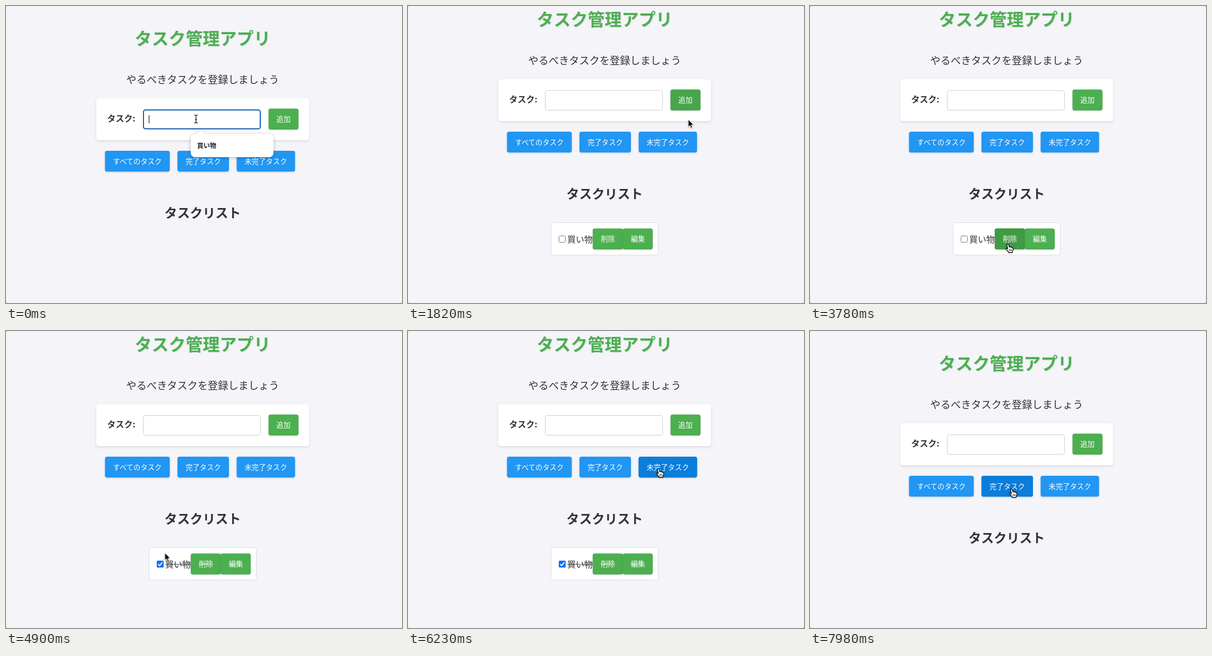
Animation of 746x560 px, one loop 8 s. Source, as an HTML page:

```html
<!DOCTYPE html>
<html lang="ja">
<head>
<meta charset="utf-8">
<title>タスク管理アプリ</title>
<style>
html, body { margin: 0; width: 100%; height: 100%; overflow: hidden; background: #a9a9ad; }
svg { display: block; width: 746px; height: 560px; font: 13.33px "Noto Sans CJK JP", "Noto Sans CJK", sans-serif; fill: #333; }
.mid { text-anchor: middle; }
.bold { font-weight: 700; }
.card { fill: #fff; filter: drop-shadow(0 2px 2.5px #0000001a); }
.title { font-size: 32px; fill: #4caf50; text-shadow: 1px 1px 2px #0000001a; }
.btn { filter: drop-shadow(0 1px 1.5px #0000002a); }
.btn text { fill: #fff; text-anchor: middle; }
.green rect { fill: #4caf50; }
.green .dark { fill: #419a45; }
.blue rect { fill: #2196f3; }
.blue .dark { fill: #0b7dda; }
.field { fill: #fff; stroke: #ccc; }

/* Every animation shares one 8 s clock; 1% is 80 ms. */
.step, .fade, .pointer { animation: 8s infinite; }
.step { animation-timing-function: step-end; }
.fade { animation-timing-function: ease; }

.page { animation-name: scroll; }
.list { animation-name: list; }
.check { animation-name: check; }
.focus { animation-name: focus; }
.caret { animation-name: caret; }
.filled { animation-name: filled; }
.popup { animation-name: popup; }
.row { animation-name: row; }
.add { animation-name: add; }
.del { animation-name: del; }
.done { animation-name: done; }
.todo { animation-name: todo; }
.pointer { animation-name: move; }
.beam { animation-name: beam; }
.arrow { animation-name: arrow; }
.hand { animation-name: hand; }
.press { animation-name: press; }

@keyframes scroll { 0%, 85.75%, 100% { transform: none } 21.875% { transform: translateY(-36px) } }
@keyframes list { 0%, 85.75%, 100% { opacity: 0 } 21.875% { opacity: 1 } }
@keyframes check { 0% { opacity: 0 } 56.875%, 100% { opacity: 1 } }
@keyframes focus { 0% { opacity: 1 } 20.125%, 100% { opacity: 0 } }
@keyframes caret { 0% { opacity: 1 } 3.5%, 100% { opacity: 0 } }
@keyframes filled { 0%, 21.875%, 100% { opacity: 0 } 3.5% { opacity: 1 } }
@keyframes popup { 0% { opacity: 1 } 8.75%, 100% { opacity: 0 } }
@keyframes row { 0% { opacity: 0 } 3.5%, 100% { opacity: 1 } }

@keyframes add { 0%, 12%, 24.5%, 100% { opacity: 0 } 14%, 21.875% { opacity: 1 } }
@keyframes del { 0%, 36.75%, 50.75%, 100% { opacity: 0 } 39.375%, 48.125% { opacity: 1 } }
@keyframes done { 0%, 64%, 77.875%, 96.5% { opacity: 0 } 66.5%, 75.25%, 99.5%, 100% { opacity: 1 } }
@keyframes todo { 0%, 75.8%, 97.2%, 100% { opacity: 0 } 77.875%, 94.5% { opacity: 1 } }

@keyframes move {
  0%, .8% { transform: translate(358px, 213px) }
  5.25%, 8.75% { transform: translate(378px, 268px); animation-timing-function: ease-in-out }
  13.1% { transform: translate(512px, 218px); animation-timing-function: linear }
  14% { transform: translate(516px, 216px) }
  15.75%, 29.75% { transform: translate(528px, 214px); animation-timing-function: ease-in-out }
  39.375%, 46.375% { transform: translate(375px, 450px); animation-timing-function: linear }
  47.25% { transform: translate(373px, 449px); animation-timing-function: ease-in-out }
  51.625%, 60.375% { transform: translate(290px, 440px); animation-timing-function: linear }
  61.25% { transform: translate(299px, 419px); animation-timing-function: ease-out }
  66.5%, 74.375% { transform: translate(373px, 259px); animation-timing-function: ease-in-out }
  77.875%, 92.75% { transform: translate(472px, 260px); animation-timing-function: ease-in-out }
  99.75%, 100% { transform: translate(380px, 298px) }
}
@keyframes beam { 0% { opacity: 1 } 2.625%, 100% { opacity: 0 } }
@keyframes arrow {
  0%, 12.25%, 36.75%, 64.2%, 100% { opacity: 0 }
  2.625%, 21.875%, 48.125% { opacity: 1 }
}
@keyframes hand {
  0%, 21.875%, 48.125% { opacity: 0 }
  12.25%, 36.75%, 64.2%, 100% { opacity: 1 }
}
@keyframes press {
  0%, 8.75%, 21.875%, 56.875%, 70.875%, 85.75%, 100% { opacity: 0 }
  7%, 20.125%, 55.125%, 69.125%, 84% { opacity: 1 }
}
</style>
</head>
<body>
<svg viewBox="0 0 746 560">
  <rect width="746" height="560" rx="3" fill="#f4f4f9"/>

  <g class="page step">
    <text class="title bold mid" x="370.5" y="73">タスク管理アプリ</text>
    <text class="mid" x="370.5" y="145.6" font-size="19.2">やるべきタスクを登録しましょう</text>

    <rect class="card" x="170" y="174" width="401" height="79" rx="5"/>
    <text class="bold" x="190.5" y="218" font-size="16">タスク:</text>
    <rect class="field" x="258.5" y="195.5" width="221" height="37" rx="4"/>
    <g class="filled step">
      <rect x="259" y="196" width="220" height="36" rx="4" fill="#e8f0fe"/>
      <text x="268.7" y="218" fill="#000">買い物</text>
    </g>
    <rect class="focus step" x="259" y="196" width="220" height="35.5" rx="4" fill="none" stroke="#1060b4" stroke-width="2"/>
    <path class="caret step" d="M269.5 206V221" stroke="#000"/>
    <g class="btn green">
      <rect x="494.5" y="193.5" width="56.5" height="39.5" rx="4"/>
      <rect class="dark add fade" x="494.5" y="193.5" width="56.5" height="39.5" rx="4"/>
      <text x="522.7" y="218">追加</text>
    </g>

    <g class="btn blue">
      <rect x="186.5" y="273" width="122" height="39.3" rx="4"/>
      <text x="247.5" y="297.5">すべてのタスク</text>
    </g>
    <g class="btn blue">
      <rect x="323" y="273" width="97" height="39.3" rx="4"/>
      <rect class="dark done fade" x="323" y="273" width="97" height="39.3" rx="4"/>
      <text x="371.5" y="297.5">完了タスク</text>
    </g>
    <g class="btn blue">
      <rect x="434.5" y="273" width="110" height="39.3" rx="4"/>
      <rect class="dark todo fade" x="434.5" y="273" width="110" height="39.3" rx="4"/>
      <text x="489.5" y="297.5">未完了タスク</text>
    </g>

    <text class="bold mid" x="370.5" y="399" font-size="24">タスクリスト</text>

    <g class="list step">
      <rect x="269.5" y="444.5" width="202" height="61" rx="4" fill="#fff" stroke="#ddd"/>
      <rect x="284.5" y="469.5" width="12" height="12" rx="2" fill="#fff" stroke="#767676"/>
      <text x="300" y="481.6" font-size="16">買い物</text>
      <g class="btn green">
        <rect x="348" y="455.5" width="57" height="39.5" rx="4"/>
        <rect class="dark del fade" x="348" y="455.5" width="57" height="39.5" rx="4"/>
        <text x="376.5" y="480">削除</text>
      </g>
      <g class="btn green">
        <rect x="404.5" y="455.5" width="56.5" height="39.5" rx="4"/>
        <text x="433" y="480">編集</text>
      </g>
      <g class="check step" fill="none">
        <rect x="284" y="469" width="13" height="13" rx="2" fill="#0075ff"/>
        <path d="M286.7 475.6L289.4 478.4 294.5 472.3" stroke="#fff" stroke-width="2"/>
        <path d="M300 476H348" stroke="#333" stroke-width="1.2"/>
        <path d="M363 475.5H390M419.5 475.5H446" stroke="#fff"/>
      </g>
    </g>
  </g>

  <g class="popup step">
    <path d="M356 241H358C363 241 365 235 368 235S373 241 378 241H496A8 8 0 0 1 504 249V277A8 8 0 0 1 496 285H356A8 8 0 0 1 348 277V249A8 8 0 0 1 356 241Z" fill="#fff" style="filter:drop-shadow(0 1px 3px #0004)"/>
    <rect class="row step" x="348" y="249" width="156" height="28" fill="#e8e8ea"/>
    <text class="bold" x="360" y="268" font-size="12" fill="#202124">買い物</text>
  </g>

  <g class="pointer">
    <circle class="press step" r="26" fill="none" stroke="#0005" stroke-width="2"/>
    <g class="beam step" fill="none" stroke-linecap="round">
      <path id="bar" d="M-3-7.5Q0-7.5 0-5.5Q0-7.5 3-7.5M0-5.5V5.5M-3 7.5Q0 7.5 0 5.5Q0 7.5 3 7.5M-1.5 1H1.5" stroke="#fff" stroke-width="2.6"/>
      <path d="M-3-7.5Q0-7.5 0-5.5Q0-7.5 3-7.5M0-5.5V5.5M-3 7.5Q0 7.5 0 5.5Q0 7.5 3 7.5M-1.5 1H1.5" stroke="#000" stroke-width="1.2"/>
    </g>
    <path class="arrow step" d="M0 0V14.2L3.2 11.2 5.4 16.3 7.7 15.3 5.6 10.4H10Z" fill="#000" stroke="#fff" style="filter:drop-shadow(0 1px 1px #0005)"/>
    <g class="hand step" stroke="#000" stroke-width="1.2" stroke-linejoin="round" style="filter:drop-shadow(0 1px 1px #0005)">
      <path d="M-2 1.5C-2.2-.4 .6-.9 1.2 1.2L2.3 5.5C3.2 4.6 4.7 4.8 5.1 6C6 5.2 7.3 5.6 7.6 6.7C8.7 6.2 9.5 6.9 9.6 8.2C9.8 10.5 9.2 12 8.4 13.5V15.6H.9V14.6C-.8 12.8-2 11-3.6 9.4C-4.6 8.2-3.5 6.9-2.2 7.7L-.4 9Z" fill="#fff"/>
      <path d="M2.3 9.5V13M4.4 9.5V13M6.5 9.5V13" fill="none" stroke-width=".9"/>
    </g>
  </g>
</svg>
</body>
</html>
```
